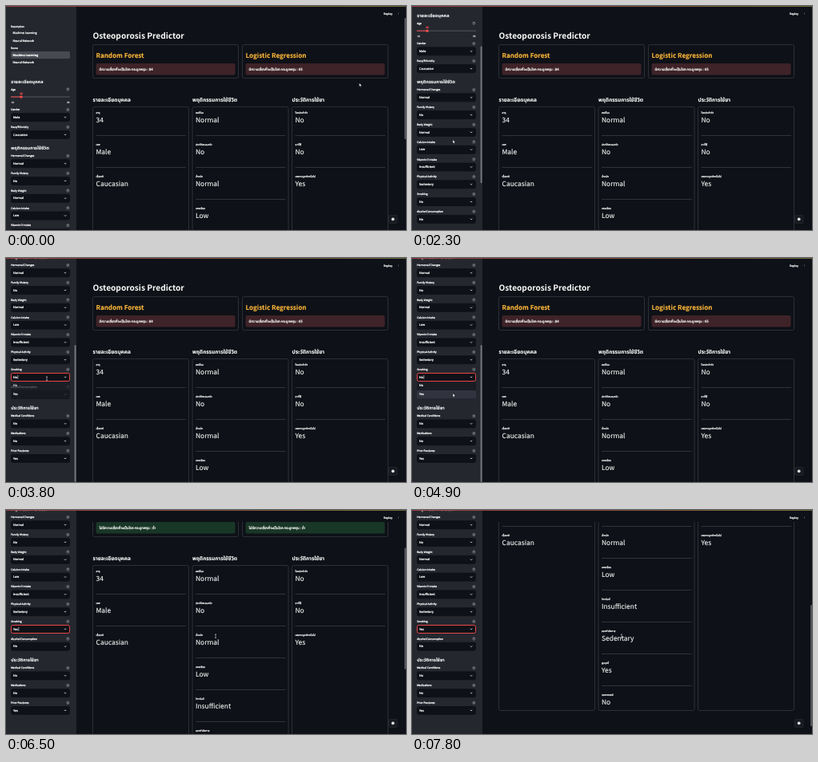
Animation of 500 by 281 pixels, one loop 8000 ms. Source, as an HTML page:

```html
<!DOCTYPE html>
<html lang="en">
<head>
<meta charset="utf-8">
<title>Osteoporosis Predictor</title>
<style>
html, body { margin: 0; width: 100%; height: 100%; overflow: hidden; background: #0e1117; }
svg { display: block; width: 100vw; height: 100vh; }
text {
  font-family: "Noto Sans CJK SC", "Noto Sans CJK JP", "Noto Sans Thai", "Noto Sans", sans-serif;
  text-rendering: geometricPrecision;
  white-space: pre;
}
</style>
</head>
<body>
<svg id="stage" viewBox="0 0 500 281">
  <defs>
    <linearGradient id="strip">
      <stop offset="0" stop-color="#a83c3e"/>
      <stop offset="1" stop-color="#77703f"/>
    </linearGradient>
    <clipPath id="mainClip"><path d="M88 15H500V281H88Z"/></clipPath>
    <clipPath id="sideClip"><path d="M0 0H88V281H0Z"/></clipPath>
  </defs>
</svg>
<script>
const LOOP = 8000, STAGE_H = 281, HEADER_H = 15;
const BG = '#0e1117', PANEL = '#25272f', INK = '#fafafa', RED = '#ff4b4b', EDGE = '#3a3d45';
const stage = document.getElementById('stage');

function add(parent, tag, attrs, content) {
  const node = document.createElementNS('http://www.w3.org/2000/svg', tag);
  for (const key in attrs) node.setAttribute(key, attrs[key]);
  if (content !== undefined) node.textContent = content;
  parent.appendChild(node);
  return node;
}
const group = (parent, attrs = {}) => add(parent, 'g', attrs);
const rect = (parent, x, y, width, height, fill, more = {}) =>
  add(parent, 'rect', { x, y, width, height, fill, ...more });
const line = (parent, d, stroke, width = 0.5) =>
  add(parent, 'path', { d, stroke, 'stroke-width': width, fill: 'none' });

// The text is centred vertically on cy; a thin outline keeps small sizes legible.
function label(parent, x, cy, size, content, { fill = INK, ...more } = {}) {
  const weight = size < 5 ? 0.22 : size < 9 ? 0.1 : 0;
  return add(parent, 'text', {
    x, y: cy + size * 0.37, 'font-size': size, fill, stroke: fill, 'stroke-width': weight, ...more
  }, content);
}
const BOLD = { 'font-weight': 700 };

// Scrolled areas: top of the track, its height and the scrollable distance
const SIDE = { top: 0, view: STAGE_H, room: 179 };
const MAIN = { top: HEADER_H, view: STAGE_H - HEADER_H, room: 199 };
const ratio = area => area.view / (area.view + area.room);
const thumb = (parent, area, x, width, fill) =>
  rect(parent, x, area.top, width, area.view * ratio(area), fill, { rx: width / 2 });

const TITLES = ['รายละเอียดบุคคล', 'พฤติกรรมการใช้ชีวิต', 'ประวัติการใช้ยา'];

// Main area
rect(stage, 0, 0, 500, STAGE_H, BG);
const main = group(group(stage, { 'clip-path': 'url(#mainClip)' }));
label(main, 108.5, 37, 10.15, 'Osteoporosis Predictor', BOLD);

const outline = { stroke: EDGE, 'stroke-width': 0.7, rx: 2 };
const alerts = [[108.5, 'Random Forest', 84], [295.5, 'Logistic Regression', 65]].map(([x, name, risk]) => {
  rect(main, x, 48.5, 182, 42, 'none', outline);
  label(main, x + 4, 62, 8.05, name, { ...BOLD, fill: '#ffb83a' });
  const box = rect(main, x + 4, 72, 174, 14.5, '#3e2328', { rx: 2 });
  const note = label(main, x + 8, 79.3, 4.3, '');
  return { box, note, risk };
});

const COLUMNS = [
  [['อายุ', '34'], ['เพศ', 'Male'], ['เชื้อชาติ', 'Caucasian']],
  [['ฮอร์โมน', 'Normal'], ['ประวัติครอบครัว', 'No'], ['น้ำหนัก', 'Normal'], ['แคลเซียม', 'Low'],
   ['วิตามินดี', 'Insufficient'], ['ออกกำลังกาย', 'Sedentary'], ['สูบบุหรี่', 'No'], ['แอลกอฮอล์', 'No']],
  [['โรคประจำตัว', 'No'], ['ยาที่ใช้', 'No'], ['เคยกระดูกหักหรือไม่', 'Yes']]
];
let smokingMetric;
COLUMNS.forEach((items, col) => {
  const x = 108.5 + col * 124.5;
  label(main, x, 118, 6.55, TITLES[col], BOLD);
  rect(main, x, 126.5, 120, 307, 'none', outline);
  items.forEach(([name, value], i) => {
    const y = 133.4 + i * 40;
    label(main, x + 4, y, 3.2, name);
    const shown = label(main, x + 4, y + 9.4, 8.45, value);
    if (col === 1 && i === 6) smokingMetric = shown;
    if (i < items.length - 1) line(main, `M${x + 4} ${y + 29.1}h112.5`, EDGE, 0.8);
  });
});

label(stage, 472, 9.3, 3.35, 'Deploy');
for (const y of [8.5, 9.6, 10.7]) add(stage, 'circle', { cx: 490.3, cy: y, r: 0.3, fill: '#d0d0d2' });
rect(stage, 478.5, 262.5, 10.5, 10, '#171a21', { rx: 1, stroke: '#2b2e36', 'stroke-width': 0.6 });
add(stage, 'circle', { cx: 483.7, cy: 267.4, r: 1.9, fill: '#dcdcdc' });
const mainThumb = thumb(stage, MAIN, 498.2, 1.6, '#65676b');

// Sidebar
const sideBox = group(stage, { 'clip-path': 'url(#sideClip)' });
rect(sideBox, 0, 0, 88, STAGE_H, PANEL);
const side = group(sideBox);
const collapse = line(side, 'M75.8 8.8l-1.7 1.7l1.7 1.7', INK);

label(side, 6, 25.5, 3.2, 'Description');
label(side, 6, 53, 3.2, 'Demo');
rect(side, 6, 57, 74, 9, '#484a53', { rx: 2 });
[34, 61.5].forEach((y, i) => {
  label(side, 8.5, y, 3.65, 'Machine Learning', i ? BOLD : {});
  label(side, 8.5, y + 9.6, 3.65, 'Neural Network');
});

function field(name, y) {
  label(side, 6.2, y, 3.28, name);
  add(side, 'circle', { cx: 77.3, cy: y, r: 1.6, fill: 'none', stroke: '#b9bac0', 'stroke-width': 0.45 });
  label(side, 77.3, y, 2.3, '?', { 'text-anchor': 'middle', fill: '#d0d1d5' });
}
function select(name, value, y) {
  field(name, y);
  const box = rect(side, 6.5, y + 4.7, 73, 10, BG, { rx: 2, stroke: BG, 'stroke-width': 0.9 });
  const shown = label(side, 9, y + 9.5, 3.75, value);
  line(side, `M72.9 ${y + 9}l1.2 1.2l1.2 -1.2`, INK, 0.75);
  return { box, shown, y };
}
const selects = (list, top) => list.map(([name, value], i) => select(name, value, top + i * 21.8));

label(side, 6.3, 95, 5.55, TITLES[0], BOLD);
field('Age', 104.5);
label(side, 19, 109.6, 3.2, '34', { 'text-anchor': 'middle', fill: RED });
line(side, 'M6 114H80', '#5a5b64', 0.9);
line(side, 'M6 114H19', RED, 0.9);
add(side, 'circle', { cx: 19, cy: 114, r: 1.7, fill: RED });
label(side, 6.5, 120.5, 3, '18', { fill: '#c0c1c6' });
label(side, 79.5, 120.5, 3, '90', { fill: '#c0c1c6', 'text-anchor': 'end' });
selects([['Gender', 'Male'], ['Race/Ethnicity', 'Caucasian']], 130);
label(side, 6.3, 178, 5.55, TITLES[1], BOLD);
const smoking = selects([
  ['Hormonal Changes', 'Normal'], ['Family History', 'No'], ['Body Weight', 'Normal'],
  ['Calcium Intake', 'Low'], ['Vitamin D Intake', 'Insufficient'],
  ['Physical Activity', 'Sedentary'], ['Smoking', 'No'], ['Alcohol Consumption', 'No']
], 188)[6];
label(side, 6.3, 367, 5.55, TITLES[2], BOLD);
selects([['Medical Conditions', 'No'], ['Medications', 'No'], ['Prior Fractures', 'Yes']], 377.2);
const caret = rect(side, 0, smoking.y + 7.2, 0.6, 4.8, INK);

const popup = group(sideBox);
rect(popup, 6, 155.2, 74, 21.3, '#1a1c24', { rx: 1.5 });
const hover = rect(popup, 6, 166, 74, 10.5, '#31333f', { rx: 1.5 });
label(popup, 9, 160, 3.75, 'No');
label(popup, 9, 171, 3.75, 'Yes');
const sideThumb = thumb(sideBox, SIDE, 85.6, 2, '#74757b');

rect(stage, 0, 0, 500, 0.9, 'url(#strip)');

// Pointer shapes
const pointer = group(stage);
const arrow = add(pointer, 'path', {
  d: 'M0 0V4.2L1 3.3L1.7 4.8L2.4 4.5L1.8 3.1H3.1Z', fill: '#fff', stroke: '#000', 'stroke-width': 0.3
});
const beam = line(pointer, 'M-1 -2H1M0 -2V2.4M-1 2.4H1', '#fff', 0.5);

// Motion: rows of [time, value, ...]
const PATH = [
  [0, 441.6, 96.7], [900, 300, 130], [1800, 54, 168], [2000, 54, 168], [2300, 51, 168], [3000, 51, 168],
  [3600, 51, 151], [4600, 51, 151], [4900, 51, 170], [5300, 51, 170], [5800, 126, 171],
  [6100, 126, 171], [6400, 262, 158]
];
const SIDE_SCROLL = [[1900, 0], [2600, 145], [2800, 179]];
const MAIN_SCROLL = [[6200, 0], [6500, 57], [7300, 182]];
const FADE = [[3700, 0], [3800, 0.75], [3900, 1], [5000, 1], [5100, 0]];

function along(rows, t, k = 1) {
  if (t <= rows[0][0]) return rows[0][k];
  for (let i = 1; i < rows.length; i++) {
    const a = rows[i - 1], b = rows[i];
    if (t <= b[0]) return a[k] + (b[k] - a[k]) * (t - a[0]) / (b[0] - a[0]);
  }
  return rows[rows.length - 1][k];
}
const set = (node, key, value) => node.setAttribute(key, value);
const show = (node, on) => set(node, 'visibility', on ? 'visible' : 'hidden');
function scroll(content, bar, area, y) {
  set(content, 'transform', `translate(0 ${-y})`);
  set(bar, 'y', area.top + y * ratio(area));
}

function draw(t) {
  const x = along(PATH, t, 1), y = along(PATH, t, 2), inSide = x < 88;
  const focused = t >= 3700, chosen = t >= 5000, updated = t >= 5400;

  scroll(side, sideThumb, SIDE, along(SIDE_SCROLL, t));
  scroll(main, mainThumb, MAIN, along(MAIN_SCROLL, t));
  show(sideThumb, inSide);
  show(collapse, inSide);
  show(mainThumb, !inSide);

  set(pointer, 'transform', `translate(${x} ${y})`);
  const overText = (t >= 3500 && t <= 4600) || t >= 6400;
  show(beam, overText);
  show(arrow, !overText);

  set(smoking.box, 'stroke', focused ? RED : BG);
  smoking.shown.textContent = chosen ? 'Yes' : 'No';
  set(caret, 'x', chosen ? 15.6 : 14.6);
  show(caret, focused && (t - (chosen ? 5200 : 3700) + LOOP) % 1000 < 500);
  set(popup, 'opacity', along(FADE, t));
  show(hover, t >= 4800);

  smokingMetric.textContent = updated ? 'Yes' : 'No';
  for (const { box, note, risk } of alerts) {
    set(box, 'fill', updated ? '#193727' : '#3e2328');
    note.textContent = updated
      ? 'ไม่มีความเสี่ยงที่จะเป็นโรค กระดูกพรุน : ต่ำ'
      : `มีความเสี่ยงที่จะเป็นโรค กระดูกพรุน : ${risk}`;
  }
}

function tick(now) {
  draw(Math.floor(now % LOOP / 100) * 100);
  requestAnimationFrame(tick);
}
draw(0);
requestAnimationFrame(tick);
</script>
</body>
</html>
```
